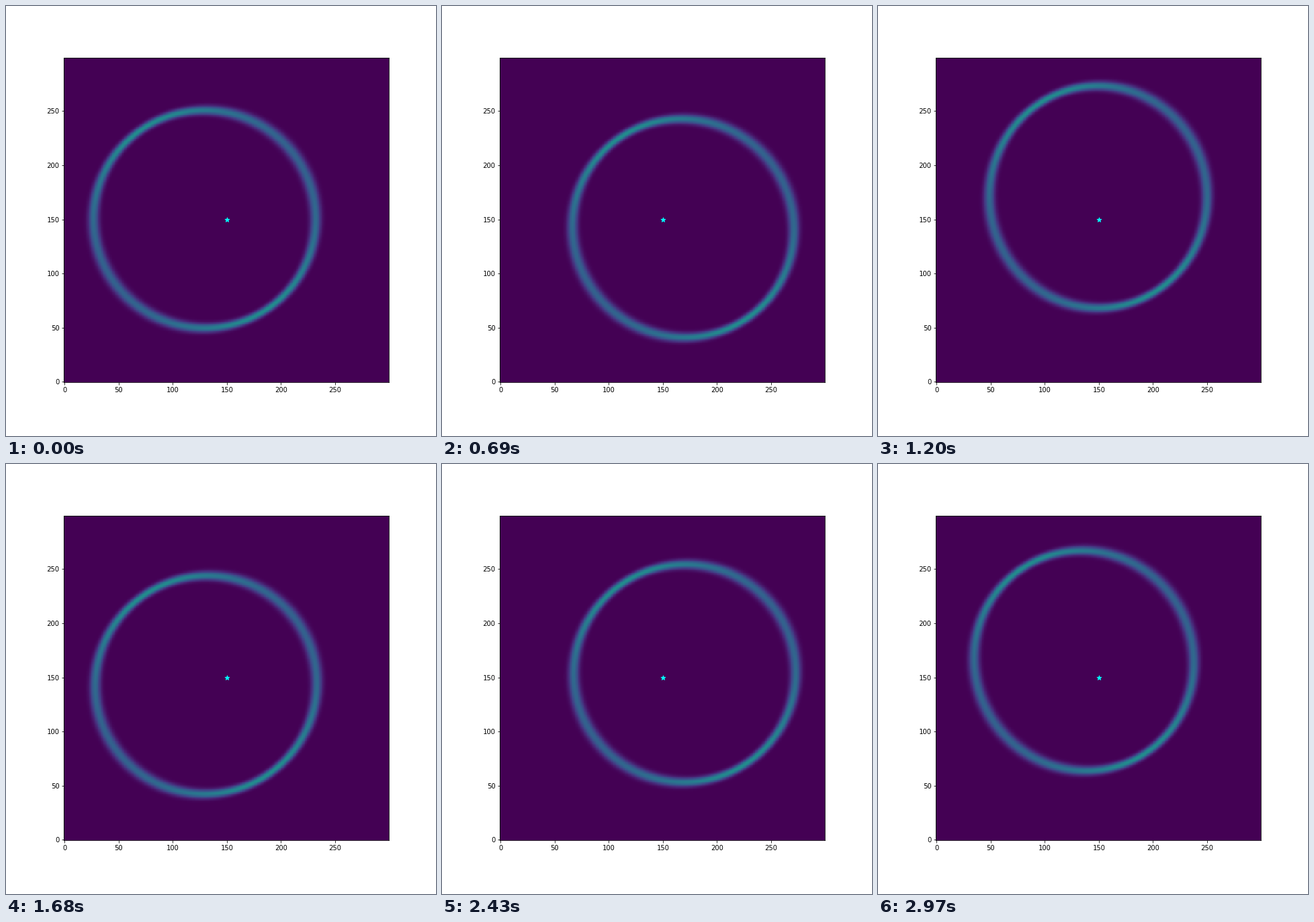
Write a matplotlib script that moves like this. It is 648 px wide and 648 px high and loops after 3000 ms.

```python
import numpy as np
import matplotlib.pyplot as plt
from matplotlib.animation import FuncAnimation

SIZE = 300                      # sky grid, cells per side
STAR = 150                      # star sits at one focus of the ring
A, ECC = 102.5, 0.2             # semi-major axis and eccentricity
BEAM_MAJ, BEAM_MIN = 3.7, 2.35  # blur sigma along the beam axes
BEAM_PA = np.radians(33)
STEP = np.radians(6.79)         # precession per frame
FRAMES = 100

y, x = np.mgrid[:SIZE, :SIZE] - float(STAR)
r = np.maximum(np.hypot(x, y), 1e-6)


def ring(i):
    """Precessing eccentric ring, blurred by an elongated beam."""
    ex, ey = ECC * np.cos(i * STEP), ECC * np.sin(i * STEP)
    gx, gy = x / r + ex, y / r + ey
    slope = np.hypot(gx, gy)
    dist = (r + ex * x + ey * y - A * (1 - ECC**2)) / slope
    along = (gx * np.cos(BEAM_PA) + gy * np.sin(BEAM_PA)) / slope
    var = BEAM_MAJ**2 * along**2 + BEAM_MIN**2 * (1 - along**2)
    return 1.16 / np.sqrt(var) * np.exp(-dist**2 / (2 * var))


fig, ax = plt.subplots(figsize=(9, 9), dpi=72, facecolor="white")
fig.subplots_adjust(left=0.125, right=0.9, bottom=0.125, top=0.88)
image = ax.imshow(ring(0), origin="lower", cmap="viridis",
                  vmin=0, vmax=1, interpolation="nearest")
ax.scatter(STAR, STAR, s=50, marker="*", color="cyan")
ax.set_xticks(range(0, SIZE, 50))
ax.set_yticks(range(0, SIZE, 50))


def update(i):
    image.set_data(ring(i))
    return (image,)


anim = FuncAnimation(fig, update, frames=FRAMES, interval=30,
                     repeat=True, repeat_delay=0)
plt.show()
```
